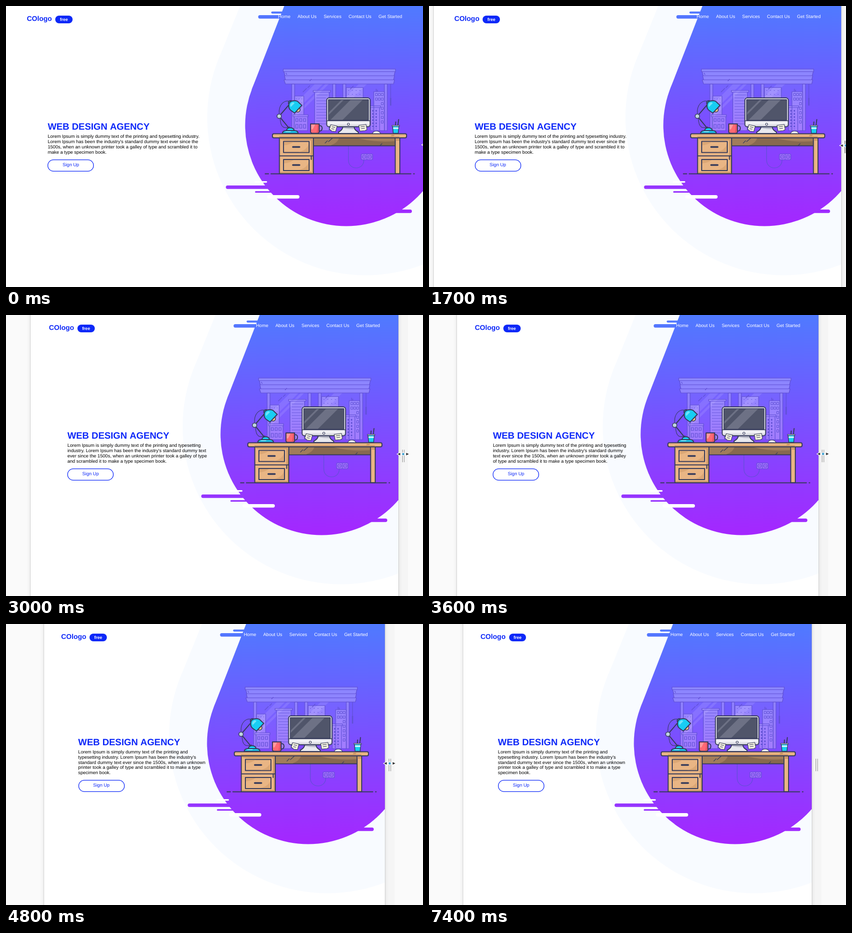
Animation, 864 px wide and 584 px high, one loop 8300 ms. Source, as an HTML page:

```html
<!DOCTYPE html>
<html lang="en">
<head>
<meta charset="utf-8">
<title>Responsive landing page</title>
<style>
  html, body { margin: 0; width: 100%; height: 100%; overflow: hidden; background: #fafafa; }
  body { position: relative; font: 9.6px/10.8px "Liberation Sans", Arial, sans-serif; text-rendering: geometricPrecision; }
  #page { position: absolute; top: 0; height: 584px; overflow: hidden; background: #fff; }
  #shade { position: absolute; top: -20px; height: 624px; box-shadow: 0 0 8px rgba(0,0,0,.13), 0 0 0 .7px rgba(0,0,0,.13); }
  #page > * { position: absolute; }
  #art { right: 0; top: 0; }
  .logo { left: 5%; top: 18.6px; font: bold 14.4px/16px "Liberation Sans", Arial, sans-serif; color: #0d28f8; white-space: nowrap; }
  .logo b { position: absolute; left: 59px; top: 1.2px; width: 35.6px; height: 16.2px; border-radius: 8.1px;
    background: #0d28f8; color: #fff; font-size: 9px; line-height: 16.2px; text-align: center; }
  nav { right: 5%; top: 18.2px; display: flex; gap: 14.67px; color: #fff; white-space: nowrap; }
  main { left: 10%; top: 0; width: 38.1%; height: 585px; display: flex; flex-direction: column; justify-content: center; }
  h1 { margin: 0 0 3.9px; font-size: 19.2px; line-height: 22px; font-kerning: none; color: #0d28f8; white-space: nowrap; }
  p { margin: 0 0 8.1px; color: #000; }
  .button { width: 96px; height: 24.9px; border-radius: 12.5px; box-shadow: inset 0 0 0 1.3px #0d28f8;
    color: #0d28f8; line-height: 24.9px; text-align: center; }
  #gutter { position: absolute; top: 0; width: 20px; height: 584px; background: #f5f5f5; }
  #gutter::after { content: ""; position: absolute; left: 7.6px; top: 280px; width: 1.4px; height: 26px;
    background: #8f8f8f; box-shadow: 3.6px 0 #8f8f8f; }
  #cursors { position: absolute; left: 0; top: 0; }

  .ink { stroke: #363b5b; stroke-width: 2; stroke-linejoin: round; stroke-linecap: round; }
  .fine { stroke-width: 1.5; }
  .thin { stroke-width: 1.1; }
  .line { fill: none; }
  .glass { fill: rgba(255,255,255,.23); stroke: #6050d4; stroke-width: 1.2; stroke-linejoin: round; }
  .trace { fill: none; stroke: #6050d4; stroke-width: 1.2; }
  .wood { fill: #e9b584; }
  .cyan { fill: #18cdf3; }
</style>
</head>
<body>
<div id="gutter"></div>
<div id="shade"></div>
<div id="page">
  <svg id="art" width="864" height="584" viewBox="0 0 864 584">
    <defs>
      <linearGradient id="sky" gradientUnits="userSpaceOnUse" x1="0" y1="0" x2="0" y2="458">
        <stop stop-color="#4f7aff"/><stop offset="1" stop-color="#a526ff"/>
      </linearGradient>
      <clipPath id="screen"><path d="M668 194.500h83v43h-83z"/></clipPath>
    </defs>
    <g fill="#f8fbff">
      <path d="M485 0L438.600 114.700 745 231.500H864V0z"/>
      <circle cx="745" cy="231.500" r="328"/>
    </g>
    <g fill="url(#sky)">
      <path d="M576.500 0L509.300 173.300 705 248H864V0z"/>
      <circle cx="705" cy="248" r="209.500"/>
      <rect x="522.500" y="19" width="60" height="7.200" rx="3.600"/>
      <rect x="549.500" y="11.500" width="40" height="4.200" rx="2.100"/>
      <rect x="455.500" y="373" width="110" height="7.200" rx="3.600"/>
      <rect x="516" y="384.800" width="50" height="3.200" rx="1.600"/>
      <rect x="780" y="423" width="61" height="7.200" rx="3.600"/>
    </g>
    <g fill="#fff">
      <rect x="515" y="364" width="26" height="3.200" rx="1.600"/>
      <rect x="541" y="393" width="67" height="7.200" rx="3.600"/>
    </g>

    <!-- window and skyline -->
    <path fill="#fff" opacity=".05" d="M598 162h78v96h-78zM704 162h80v96h-80z"/>
    <path fill="#fff" opacity=".1" d="M598 204L640 162h17L598 221zM662 162h7L598 233v-7zM704 189L731 162h17L704 206z"/>
    <g class="glass">
      <path d="M592 162h6v97h-6zM677 162h6v97h-6zM698 162h6v97h-6zM784 162h6v97h-6z"/>
      <path d="M598 187h19v39h-19zM597 230h28v29h-28zM595 226h31v4h-31z"/>
      <path d="M639.500 179h30v80h-30zM636.500 175.500h36v3.500h-36z"/>
      <path d="M705 169.500h35v30h-35zM762 178h22v81h-22zM755 211h19v48h-19zM753 207.500h23v3.500h-23z"/>
    </g>
    <g class="trace">
      <path d="M601 193h14M601 201h14" stroke-dasharray="1.500 4"/>
      <path d="M709 175.500h29M709 183.500h29" stroke-dasharray="1.800 6"/>
      <path d="M643 185h24M643 191h20M643 197h24M643 203h22M643 209h24M643 215h20M643 221h24M643 227h22M643 233h24M643 239h24M643 245h20" opacity=".8"/>
      <path d="M600.500 234h4.500v6h-4.500zM608.500 234h4.500v6h-4.500zM616.500 234h4.500v6h-4.500zM600.500 246h4.500v8h-4.500zM608.500 246h4.500v8h-4.500zM616.500 246h4.500v8h-4.500z"/>
      <path d="M765.500 181.500h4v5h-4zM771.500 181.500h4v5h-4zM777.500 181.500h4v5h-4zM765.500 191h4v5h-4zM771.500 191h4v5h-4zM777.500 191h4v5h-4zM777.500 200.500h4v5h-4zM777.500 210h4v5h-4zM777.500 219.500h4v5h-4zM777.500 229h4v5h-4zM777.500 238.500h4v5h-4z" stroke-width="1"/>
      <path d="M760 216v40M767 216v40" stroke-width="2.600" stroke-dasharray="3.500 3"/>
      <path d="M767 172v6M769.500 174v4M797 162v45"/>
      <path d="M797 191v16" stroke-width="2.600"/>
      <path d="M615 179l8-8M625 170l5-5M713 173l7-7"/>
    </g>
    <g class="glass fine">
      <path d="M576 136.500h230l-2 8.500H578zM577 145h228l-2 8.500H579zM576 153.500h229l-2 8.500H579z"/>
      <path d="M574.500 131h232.500v5.500H574.500z"/>
      <path class="line" d="M580 139l2 4M629 156l4-4"/>
    </g>
    <path class="trace fine" d="M709.500 291v29c0 22 32 22 32 0"/>
    <rect class="glass" x="736" y="307.500" width="23.500" height="12" rx="2"/>
    <path class="trace" d="M747.800 308v11"/>
    <g class="trace"><circle cx="742" cy="313.500" r="3.500"/><circle cx="753.800" cy="313.500" r="3.500"/><path d="M740.500 313.500h3M752.300 313.500h3"/></g>

    <!-- desk -->
    <path class="ink" fill="#87694f" d="M637 274h170v16.500H637z"/>
    <path fill="#a17d5b" d="M638 275h52q-4 10-17 14.500h-35zM730 275h75v6q-40 3-75-6z"/>
    <path class="ink line thin" d="M661 285l5-5M668 282l8-7M775 290l4-4"/>
    <path class="ink wood" d="M566.500 274H637v74.500h-70.500zM806.500 274H816v74.500h-9.500z"/>
    <path fill="#cf9a68" d="M567.500 275H636v4h-52q-9 0-16.500-2zM632 279h4v32h-4zM568 345h66v-33h2v35.500h-68zM807.500 275h7.500v5h-7.500z"/>
    <path class="ink line" d="M567 311.500h70M632.500 313v6"/>
    <g id="drawer">
      <path class="ink wood" d="M575 281.500h53v23h-53z"/>
      <path fill="#d7a270" d="M606 303.500q17-4 21-16v16zM576 282.500h20q-8 6-20 7z" opacity=".7"/>
      <path class="ink" d="M594.500 293h13.500" style="stroke-width:3.500"/>
    </g>
    <use href="#drawer" y="37.500"/>
    <rect class="ink wood" x="552" y="265.500" width="278" height="8.500" rx="3"/>
    <path fill="#cf9a68" d="M566 270.800h250l-2 2.200H566zM800 266.500h6l-4 6h-6z"/>
    <path class="ink line" d="M537 348.700h7M549 348.700h290M844.500 348.700h1.500"/>

    <!-- monitor -->
    <path class="ink" fill="#e9e9ef" d="M698 251h23q1 7 9 11v3h-41v-3q8-4 9-11z"/>
    <path fill="#b9bac8" d="M699 252h21l1 4q-12 0-22-2z"/>
    <rect class="ink" fill="#f0f0f4" x="664.500" y="191" width="90" height="60" rx="5"/>
    <path fill="#d8d8e0" d="M667 246.500h86q-1 3.500-4 3.500h-79q-3 0-3-3.500z"/>
    <path fill="#50556a" d="M668 194.500h83v43h-83z"/>
    <g clip-path="url(#screen)" fill="#6d7185"><path d="M671 238l44-44h25l-44 44zM668 222l28-28h5l-33 33z"/></g>
    <path class="ink line fine" d="M668 194.500h83v43h-83zM665 238.500h89"/>
    <circle class="ink thin" fill="#fff" cx="709.500" cy="245.700" r="2.200"/>
    <g class="ink thin" fill="#f2f0df">
      <path d="M673 246.500l13 3-3 11.500-8-1-5-4zM731 248l15-2 2 11-4 2-11 1z"/>
      <path class="line" d="M675.500 251l6 1.500M674.500 255l5 1M735 251l8-1M736 255l7-1"/>
      <path d="M759 265q2-5 8.500-5t8.500 5z" fill="#fff"/>
    </g>

    <!-- mug and pencil cup -->
    <path class="ink line" d="M649 249q6-1 6 5t-6 6"/>
    <path class="ink" fill="#ff6974" d="M631 245h18v16q0 3.500-4 3.500h-10q-4 0-4-3.500z"/>
    <path fill="#ff9ba0" d="M632.500 246.500h8l-5 10h-3z"/>
    <path fill="#e65466" d="M645.500 246h2.500v15q0 2.500-5 2.500 2.500-7 2.500-17.500z"/>
    <path class="ink line" d="M807 248l.5-7M812 248l1.500-12"/>
    <path class="ink cyan fine" d="M801 249h13l-1.200 15.500h-10.600z"/>
    <path fill="#d9f8ff" d="M802 252.500h11.300l-.2 3h-10.900z"/>
    <path class="ink thin" fill="#e8fbff" d="M799.800 248h15.500v2h-15.500z"/>

    <!-- lamp -->
    <path class="ink line thin" d="M566 223c-1-17 9-28 22-25M568 234c1 20 9 21 20 17"/>
    <path class="ink line" d="M589 257L566 229 590 201"/>
    <circle class="ink fine" fill="#bfd4e2" cx="566" cy="229" r="4.600"/>
    <circle class="ink cyan" cx="589.500" cy="201" r="4.300"/>
    <circle class="ink fine" fill="#f5ca86" cx="604.500" cy="215.500" r="5"/>
    <path class="ink cyan" d="M586 206q0-8 9-9 8-1 11 3l7 6.500-15 16-7-5q-6-4-5-11.500z"/>
    <path fill="#6fe4fb" d="M589 206q1-5 6-6l3 2-8 8z"/>
    <path class="ink cyan" d="M581 259q1-6 8-6t8 6z"/>
    <path class="ink cyan" d="M572.500 264.500q1-5.500 8-5.500h17q7 0 8 5.500z"/>
    <path fill="#86ecff" d="M578 262q1-1.800 4-1.800h9l-2 1.800z"/>
  </svg>
  <div class="logo">COlogo<b>free</b></div>
  <nav><span>Home</span><span>About Us</span><span>Services</span><span>Contact Us</span><span>Get Started</span></nav>
  <main>
    <h1>WEB DESIGN AGENCY</h1>
    <p>Lorem Ipsum is simply dummy text of the printing and typesetting industry. Lorem Ipsum has been the industry's standard dummy text ever since the 1500s, when an unknown printer took a galley of type and scrambled it to make a type specimen book.</p>
    <div class="button">Sign Up</div>
  </main>
</div>
<svg id="cursors" width="864" height="584">
  <g id="resize" stroke="#fff" stroke-width="1.200" stroke-linejoin="round">
    <path id="tip" fill="#333" d="M-13 0L-5.500-3.700V3.700z"/>
    <use href="#tip" transform="scale(-1 1)"/>
    <circle r="3" fill="#3f9fd0"/>
  </g>
  <path id="pointer" fill="#111" stroke="#fff" stroke-width="1.200" stroke-linejoin="round"
    d="M802 294v16l3.700-3.500 2.600 6.500 2.700-1.100-2.600-6.200h5z"/>
</svg>
<script>
  const STAGE = 864, LOOP = 8300, STEP = 100;
  // [time, right edge of the page]
  const EDGE = [
    [0, 864], [700, 864], [900, 863], [1000, 863], [1300, 861], [1900, 850], [2100, 842], [2500, 838],
    [2900, 838], [3000, 813], [3200, 812.7], [3300, 811], [3400, 811], [3800, 802], [4000, 802],
    [4100, 797], [4400, 796.6], [4500, 788], [4700, 788], [4800, 785], [5000, 785], [5100, 784],
    [5500, 784], [5700, 781], [5800, 781], [5900, 779], [6400, 779], [6500, 793], [6700, 793],
    [6800, 793.4], [LOOP, 793.4]
  ];
  const CURSOR_Y = [[0, 288.5], [1300, 290.5], [2100, 289.5], [4100, 288.5], [5900, 291.5], [6400, 291.5], [6800, 297], [LOOP, 297]];
  const $ = id => document.getElementById(id);

  function track(points, time) {
    const i = points.findIndex(p => p[0] > time);
    const [t0, a] = points[i - 1], [t1, b] = points[i];
    return a + (b - a) * (time - t0) / (t1 - t0);
  }

  function draw() {
    const time = Math.floor(performance.now() % LOOP / STEP) * STEP;
    const right = track(EDGE, time);
    for (const id of ["page", "shade"]) {
      $(id).style.left = STAGE - right + "px";
      $(id).style.width = 2 * right - STAGE + "px";
    }
    $("gutter").style.left = right + "px";
    $("resize").setAttribute("transform", `translate(${right + 10} ${track(CURSOR_Y, time)})`);
    $("resize").style.display = time < 7000 ? "" : "none";
    $("pointer").style.display = time >= 7000 && time < 7400 ? "" : "none";
    requestAnimationFrame(draw);
  }
  draw();
</script>
</body>
</html>
```
